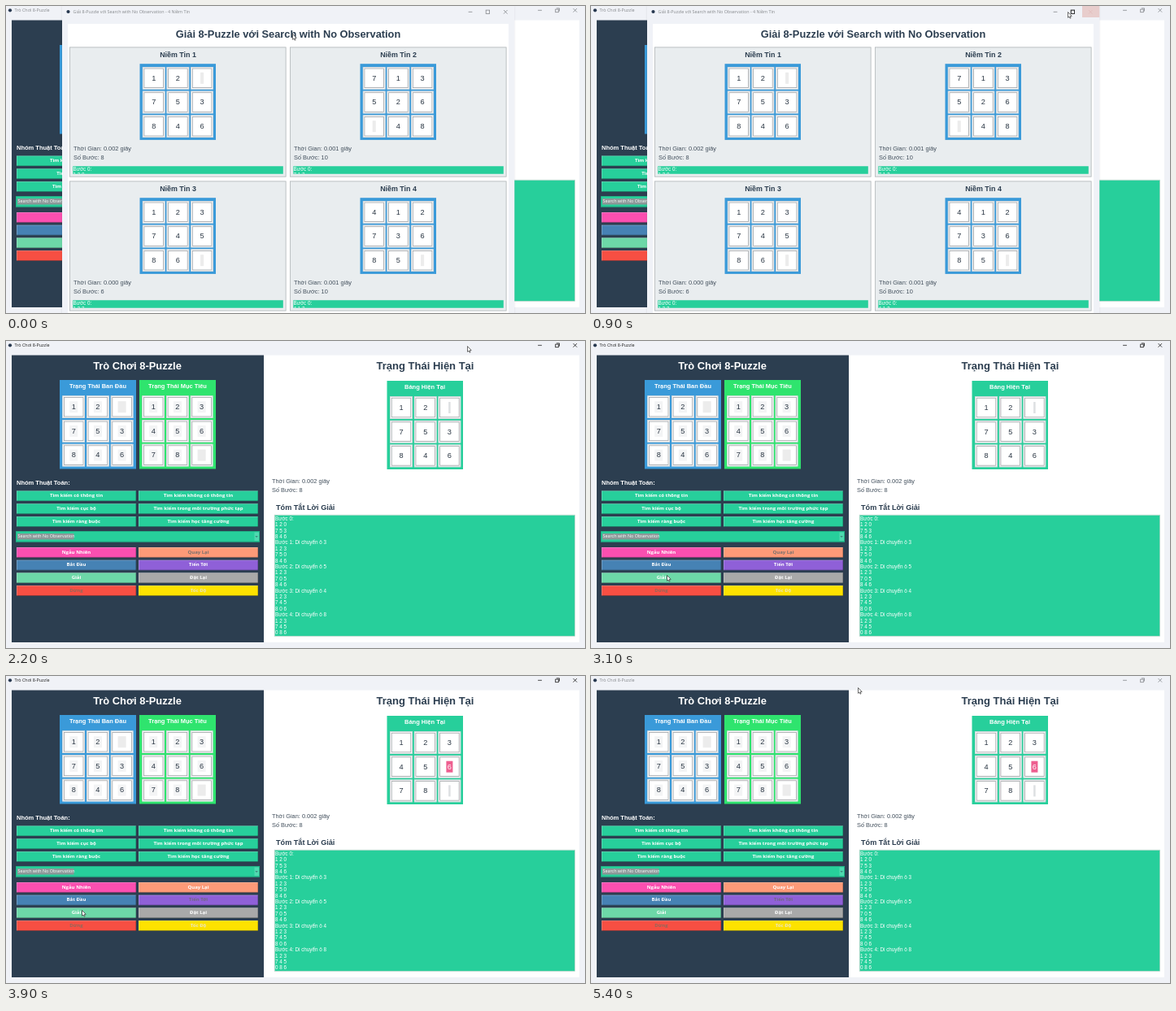
An HTML page with a canvas that plays this animation: 712x378 px, repeating every 5600 ms.

```html
<!DOCTYPE html>
<html lang="vi">
<head>
<meta charset="utf-8">
<title>8-Puzzle</title>
<style>
  html, body { margin: 0; width: 100%; height: 100%; overflow: hidden; background: #f0f2f7; }
  canvas { display: block; width: 712px; height: 378px; }
</style>
</head>
<body>
<canvas id="stage"></canvas>
<script>
const W = 712, H = 378, LOOP = 5600, STEP = 100;
const ARIAL = '"Liberation Sans", Arial, sans-serif';
const UI = '"Open Sans", sans-serif';
const NAVY = '#2c3e50', GREEN = '#27cf9b', BLUE = '#3a9ad9', CHROME = '#f0f2f7';
const INFO = '#43505d', ACTIVE = '#1d1d1d', INACTIVE = '#85888c';
const SEARCH = 'Search with No Observation';

const canvas = document.getElementById('stage');
const ratio = window.devicePixelRatio || 1;
canvas.width = W * ratio;
canvas.height = H * ratio;
const ctx = canvas.getContext('2d');
ctx.scale(ratio, ratio);
ctx.textBaseline = 'middle';

// Every board of the solution, obtained by sliding tiles into the gap.
const START = '120753846', MOVES = '35487456';
const slide = (board, tile) =>
  [...board].map(c => c === tile ? '0' : c === '0' ? tile : c).join('');
const boards = [START];
for (const tile of MOVES) boards.push(slide(boards.at(-1), tile));

const rows = board => board.match(/.../g).map(row => [...row].join(' '));
const summary = boards.slice(0, 5).flatMap((board, i) =>
  [i ? `Bước ${i}: Di chuyển ô ${MOVES[i - 1]}` : 'Bước 0:', ...rows(board)]);

const beliefs = [
  ['120753846', '0.002', 8], ['713526048', '0.001', 10],
  ['123745860', '0.000', 6], ['412736850', '0.001', 10]
];

// Pointer tip: time, x, y
const pointerPath = [
  [0, 352, 34], [600, 609, 6], [800, 609, 6], [900, 586, 7], [1200, 586, 9],
  [1400, 564, 12], [1500, 564, 12], [1600, 567, 6], [1700, 567, 5],
  [2200, 567, 6], [2300, 567, 6], [2700, 330, 150], [3000, 93, 288],
  [4000, 93, 288], [4100, 106, 273], [4200, 106, 273], [4800, 358, 21],
  [5200, 328, 14], [LOOP, 328, 14]
];

function rect(x, y, w, h, color) {
  ctx.fillStyle = color;
  ctx.fillRect(x, y, w, h);
}

function frame(x, y, w, h, color, width = 1) {
  ctx.strokeStyle = color;
  ctx.lineWidth = width;
  ctx.strokeRect(x, y, w, h);
}

function text(str, x, y, size, { color = NAVY, bold, align = 'left', font = ARIAL } = {}) {
  ctx.font = `${bold ? 'bold ' : ''}${size}px ${font}`;
  ctx.textAlign = align;
  ctx.fillStyle = color;
  ctx.fillText(str, x, y);
}

const heading = (str, x, y, size, color) =>
  text(str, x, y, size, { color, bold: true, align: 'center' });

function path(points, stroke, width = 0.8) {
  ctx.beginPath();
  points.forEach(([x, y]) => ctx.lineTo(x, y));
  ctx.strokeStyle = stroke;
  ctx.lineWidth = width;
  ctx.stroke();
}

// cx, cy: centre of the first tile; mark: size of the patch behind tile labels
function tiles(cx, cy, board, { mark = 0, blank, blankColor = '#ececec', hot } = {}) {
  [...board].forEach((digit, i) => {
    const x = cx + i % 3 * 29.7, y = cy + Math.floor(i / 3) * 29.7;
    rect(x - 13.8, y - 13.8, 27.6, 27.6, '#fff');
    frame(x - 13.4, y - 13.4, 26.8, 26.8, '#cdd2d6', 0.8);
    frame(x - 11.8, y - 11.8, 23.6, 23.6, '#9fa2a5', 0.8);
    if (digit === '0') {
      rect(x - blank / 2, y - 7, blank, 14, blankColor);
      return;
    }
    if (mark) rect(x - mark / 2, y - 7, mark, 14, '#f3f4f5');
    if (digit === hot) rect(x - 4, y - 7, 8, 14, '#ee5f90');
    text(digit, x, y + 0.3, 9.2, { color: digit === hot ? '#fff' : '#2b3744', align: 'center' });
  });
}

function button(label, col, y, color, ink = '#fff') {
  const x = 13 + col * 150;
  rect(x, y, 147, 12.5, color);
  rect(x, y, 147, 0.6, 'rgba(255,255,255,.35)');
  rect(x, y, 0.6, 12.5, 'rgba(255,255,255,.35)');
  rect(x, y + 11.9, 147, 0.6, 'rgba(0,0,0,.3)');
  rect(x + 146.4, y, 0.6, 12.5, 'rgba(0,0,0,.3)');
  text(label, x + 73.5, y + 6.2, 6, { color: ink, bold: true, align: 'center', font: UI });
}

function appIcon(x, y) {
  ctx.beginPath();
  ctx.arc(x, y, 2.1, 0, 7);
  ctx.fillStyle = '#27384f';
  ctx.fill();
}

function windowControls(x, y, color, { double = false, closeInk = color } = {}) {
  path([[x - 2.4, y], [x + 2.4, y]], color);
  if (double) path([[x + 20.3, y - 2.5], [x + 24, y - 2.5], [x + 24, y + 1.2]], color);
  const side = double ? 3.6 : 4.4;
  frame(x + 19.2, y - (double ? 1.2 : 2.2), side, side, color, 0.8);
  path([[x + 41, y - 2.3], [x + 45.6, y + 2.3]], closeInk);
  path([[x + 41, y + 2.3], [x + 45.6, y - 2.3]], closeInk);
}

function controlPanel(step) {
  rect(7, 17.5, 310, 353.5, NAVY);
  heading('Trò Chơi 8-Puzzle', 161.5, 31, 12.9, '#fff');

  rect(66, 48, 94, 109.5, BLUE);
  heading('Trạng Thái Ban Đầu', 113, 56.3, 7.45, '#fff');
  tiles(83.2, 81.2, START, { mark: 10, blank: 10 });
  rect(164, 48, 94, 109.5, '#2fe46e');
  heading('Trạng Thái Mục Tiêu', 211, 56.3, 7.45, '#fff');
  tiles(181.2, 81.2, boards.at(-1), { mark: 10, blank: 10 });

  text('Nhóm Thuật Toán:', 13, 174.7, 7.5, { color: '#fff', bold: true });
  [['Tìm kiếm có thông tin', 'Tìm kiếm không có thông tin'],
   ['Tìm kiếm cục bộ', 'Tìm kiếm trong môi trường phức tạp'],
   ['Tìm kiếm ràng buộc', 'Tìm kiếm học tăng cường']
  ].forEach((pair, i) => pair.forEach((label, col) => button(label, col, 184.5 + i * 15.8, GREEN)));

  rect(12, 234, 300, 13.5, GREEN);
  frame(12.5, 234.5, 299, 12.5, '#1fa67c', 0.7);
  rect(14, 237, 69.5, 7.5, '#8b9898');
  text(SEARCH, 14.5, 240.6, 5.4, { color: '#fff', font: UI });
  rect(305.5, 235.5, 5.5, 10.5, '#4fd9b0');
  path([[307, 240], [308.2, 241.4], [309.4, 240]], NAVY, 0.7);

  const running = step > 0 && step < MOVES.length;
  button('Ngẫu Nhiên', 0, 254, '#fb4fb0');
  button('Quay Lại', 1, 254, '#fd9a78', step ? '#fff' : '#77706e');
  button('Bắt Đầu', 0, 269.7, '#4682b4');
  button('Tiến Tới', 1, 269.7, '#8f60d8', step < MOVES.length ? '#fff' : '#6f6a80');
  button('Giải', 0, 285.4, '#6dd8a8');
  button('Đặt Lại', 1, 285.4, '#a9a9a9');
  button('Dừng', 0, 301.1, '#f74f43', running ? '#fff' : '#8d6a5c');
  button('Tốc Độ', 1, 301.1, '#fde200', '#e9e4c4');
}

function statePanel(step) {
  rect(317, 17.5, 388, 353.5, '#fff');
  heading('Trạng Thái Hiện Tại', 515.5, 31.5, 13);
  rect(468.5, 49, 93.5, 109, GREEN);
  heading('Bảng Hiện Tại', 515, 57.2, 7.5, '#fff');
  tiles(486, 82, boards[step], { blank: 2.5, blankColor: '#dde0e2', hot: MOVES[step - 1] });
  text('Thời Gian: 0.002 giây', 327, 173, 7.4, { color: INFO });
  text('Số Bước: 8', 327, 184, 7.4, { color: INFO });
  text('Tóm Tắt Lời Giải', 332, 205.5, 9.15, { bold: true });

  rect(330.5, 214.5, 369, 148.7, GREEN);
  frame(330.2, 214.2, 369.4, 149.2, '#a9cfc1', 0.7);
  summary.forEach((line, i) => text(line, 331, 219 + i * 7.4, 6.3, { color: '#fff' }));
}

function mainWindow(t, step) {
  const ink = t >= 2200 && t < 5000 ? ACTIVE : INACTIVE;
  rect(0, 0, W, H, CHROME);
  appIcon(5, 5.3);
  text('Trò Chơi 8-Puzzle', 10.5, 5.4, 5.4, { color: ink, font: UI });
  windowControls(656.5, 5.3, ink, { double: true });
  controlPanel(step);
  statePanel(step);
}

function beliefCard([board, seconds, count], i) {
  ctx.save();
  ctx.translate(i % 2 * 271, Math.floor(i / 2) * 165);
  rect(78, 50.5, 266.5, 160, '#e9edef');
  frame(78.4, 50.9, 265.7, 159.2, '#b3b7ba', 0.8);
  heading(`Niềm Tin ${i + 1}`, 211.5, 60.9, 8.9);
  rect(164.5, 71.2, 93.5, 93.7, BLUE);
  tiles(181.7, 88.8, board, { blank: 4 });
  text(`Thời Gian: ${seconds} giây`, 83, 175.5, 7.4, { color: INFO });
  text(`Số Bước: ${count}`, 83, 186.5, 7.4, { color: INFO });
  ctx.beginPath();
  ctx.rect(82.3, 197.3, 258.5, 9.4);
  ctx.clip();
  rect(82, 197, 259, 10, GREEN);
  text('Bước 0:', 82.5, 201.2, 6.3, { color: '#fff' });
  text(rows(board)[0], 82.5, 208.4, 6.3, { color: '#fff' });
  ctx.restore();
}

function popup(t) {
  const ink = t >= 1700 ? ACTIVE : INACTIVE;
  const closeHover = t >= 600 && t < 900, closeFade = t === 900;
  ctx.save();
  ctx.shadowColor = 'rgba(0,0,0,.15)';
  ctx.shadowBlur = 3;
  rect(69, 0, 556.3, H + 10, CHROME);
  ctx.restore();
  if (closeHover) rect(604, 0, 21.3, 14, '#c42b1c');
  else if (closeFade) rect(604, 0, 21.3, 14, '#e8cdcc');
  if (t >= 1600) rect(560, 0, 22, 14, '#e7eaef');
  appIcon(76.5, 7);
  text(`Giải 8-Puzzle với ${SEARCH} - 4 Niềm Tin`, 82.5, 7.2, 5.4, { color: ink, font: UI });
  windowControls(571, 7.3, ink, { closeInk: closeHover ? '#fff' : closeFade ? '#e0bcba' : ink });
  if (t >= 900 && t < 1300) frame(590.2, 5.1, 4.4, 4.4, ACTIVE, 0.8);
  rect(76, 22, 542, H - 22, '#fff');
  heading(`Giải 8-Puzzle với ${SEARCH}`, 347, 35, 12.8);
  beliefs.forEach(beliefCard);
}

function pointer(t) {
  const next = pointerPath.findIndex(key => key[0] > t);
  const [t0, x0, y0] = pointerPath[next - 1], [t1, x1, y1] = pointerPath[next];
  const u = (t - t0) / (t1 - t0), ease = u * u * (3 - 2 * u);
  ctx.save();
  ctx.translate(x0 + (x1 - x0) * ease, y0 + (y1 - y0) * ease);
  ctx.beginPath();
  [[0.5, 0.5], [0.5, 7.3], [2, 6], [3, 8.2], [4.1, 7.7], [3.2, 5.6], [5.2, 5.4]]
    .forEach(([x, y]) => ctx.lineTo(x, y));
  ctx.closePath();
  ctx.fillStyle = '#fff';
  ctx.fill();
  ctx.strokeStyle = '#333';
  ctx.lineWidth = 0.7;
  ctx.stroke();
  ctx.restore();
}

function draw() {
  const t = Math.floor(performance.now() % LOOP / STEP) * STEP;
  const step = Math.max(0, Math.min(MOVES.length, (t - 3100) / STEP));
  mainWindow(t, step);
  if (t < 2200) popup(t);
  pointer(t);
  requestAnimationFrame(draw);
}
draw();
</script>
</body>
</html>
```
